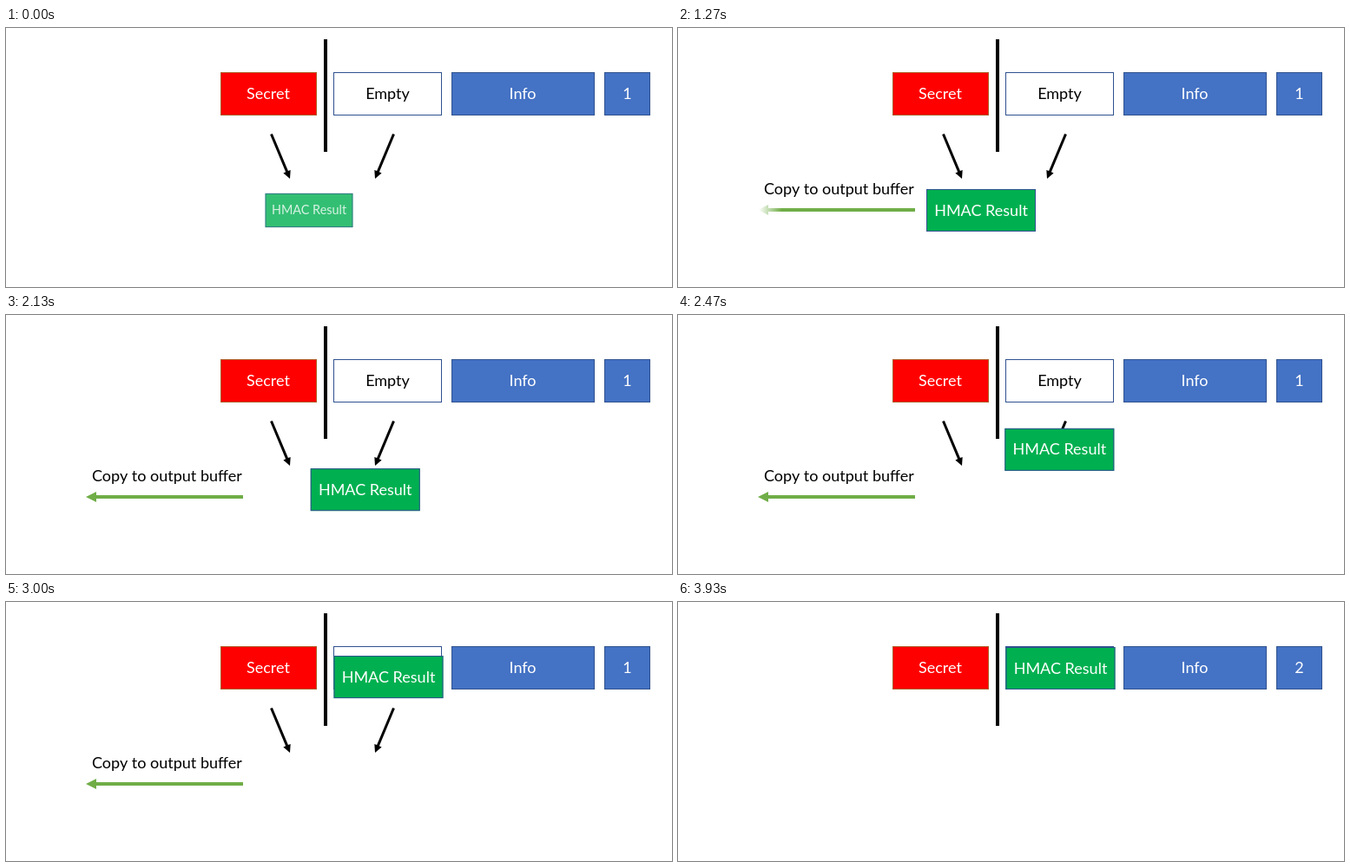
These frames come from a looping animation (767x299 px, 3.99 s). An HTML page with a canvas:

```html
<!DOCTYPE html>
<html lang="en">
<head>
<meta charset="utf-8">
<title>Key expansion step</title>
<style>
  html, body { margin: 0; width: 100%; height: 100%; overflow: hidden; background: #fff; }
  canvas { display: block; }
</style>
</head>
<body>
<canvas id="stage" width="767" height="299"></canvas>
<script>
const ctx = document.getElementById('stage').getContext('2d');
const LOOP = 3990;
const STEP = 200 / 3;
const NAVY = '#2f528f', BLUE = '#4472c4', GREEN = '#00b050';

const clamp = v => Math.min(1, Math.max(0, v));
const progress = (t, start, length) => clamp((t - start) / length);

// Progress along the travel path: [tick, fraction]
const travelKeys = [
  [22, 0], [28, .084], [32, .359], [36, .573],
  [37, .611], [44, .931], [45, .95], [51, 1]
];

function slopeAt(keys, i) {
  if (i === 0 || i === keys.length - 1) return 0;
  const [a, b] = [keys[i - 1], keys[i + 1]];
  return (b[1] - a[1]) / (b[0] - a[0]);
}

function smoothKeys(keys, x) {
  if (x <= keys[0][0]) return keys[0][1];
  const i = keys.findIndex(key => key[0] >= x);
  if (i < 0) return keys[keys.length - 1][1];
  const [x0, y0] = keys[i - 1], [x1, y1] = keys[i];
  const span = x1 - x0, u = (x - x0) / span, u2 = u * u, u3 = u2 * u;
  return y0 + (y1 - y0) * (3 * u2 - 2 * u3)
    + span * slopeAt(keys, i - 1) * (u3 - 2 * u2 + u)
    + span * slopeAt(keys, i) * (u3 - u2);
}

// Straight right, rounded turn, straight up
function travelOffset(s) {
  const w = 91.5, h = -134, turnIn = .226, turnOut = .668;
  if (s < turnIn) return [w / 2 * s / turnIn, 0];
  if (s > turnOut) return [w, h / 2 * (1 + (s - turnOut) / (1 - turnOut))];
  const t = (s - turnIn) / (turnOut - turnIn), r = 1 - t;
  const cubic = (a, b, c, d) => a * r ** 3 + 3 * b * r * r * t + 3 * c * r * t * t + d * t ** 3;
  return [w * cubic(.5, .724, 1, 1), h * cubic(0, 0, .276, .5)];
}

function label(text, x, baseline, color, align = 'center') {
  ctx.font = '18px Lato, Carlito, sans-serif';
  ctx.textAlign = align;
  ctx.fillStyle = color;
  ctx.fillText(text, x, baseline);
}

function box(x, y, w, h, fill, border) {
  ctx.fillStyle = fill;
  ctx.fillRect(x, y, w, h);
  ctx.strokeStyle = border;
  ctx.lineWidth = 1;
  ctx.strokeRect(x + .5, y + .5, w - 1, h - 1);
}

function arrow(x0, y0, x1, y1, width, paint) {
  const length = Math.hypot(x1 - x0, y1 - y0), head = width * 3;
  ctx.save();
  ctx.translate(x1, y1);
  ctx.rotate(Math.atan2(y1 - y0, x1 - x0));
  ctx.fillStyle = paint;
  ctx.beginPath();
  ctx.moveTo(0, 0);
  ctx.lineTo(-head, head / 2);
  ctx.lineTo(-head, width / 2);
  ctx.lineTo(-length, width / 2);
  ctx.lineTo(-length, -width / 2);
  ctx.lineTo(-head, -width / 2);
  ctx.lineTo(-head, -head / 2);
  ctx.fill();
  ctx.restore();
}

function withAlpha(alpha, draw) {
  if (alpha <= 0) return;
  ctx.save();
  ctx.globalAlpha = alpha;
  draw();
  ctx.restore();
}

// Soft-edged wipe from right to left
function outputArrow(wipe) {
  const left = 92, right = 273, soft = 27;
  const front = right - (right - left + soft) * wipe;
  const length = right - left;
  // Gradient runs in the arrow's own rotated space, tip at zero
  const paint = ctx.createLinearGradient(left - front, 0, left - front - soft, 0);
  paint.addColorStop(0, 'rgba(112,173,71,0)');
  paint.addColorStop(1, 'rgb(112,173,71)');
  arrow(left + length, 210, left, 210, 4, paint);
}

function resultBox(zoom, dx, dy) {
  ctx.save();
  ctx.translate(349 + dx, 210.5 + dy);
  ctx.scale(zoom, zoom);
  ctx.globalAlpha = zoom;
  box(-63, -24.5, 126, 49, GREEN, NAVY);
  label('HMAC Result', 0, 6, '#fff');
  ctx.restore();
}

function draw(tick) {
  const t = tick * STEP;
  const fade = progress(t, 3425, 500);

  ctx.fillStyle = '#fff';
  ctx.fillRect(0, 0, 767, 299);

  box(247, 51, 111, 50, '#f00', '#ae5a21');
  label('Secret', 302, 82, '#fff');
  ctx.fillStyle = '#000';
  ctx.fillRect(366, 13, 4, 130);
  box(377, 51, 125, 50, '#fff', NAVY);
  label('Empty', 439.5, 82, '#000');
  box(513, 51, 165, 50, BLUE, NAVY);
  label('Info', 595, 82, '#fff');
  box(689, 51, 53, 50, BLUE, NAVY);
  withAlpha(1 - fade, () => label('1', 715.5, 82, '#fff'));
  withAlpha(fade, () => label('2', 715.5, 82, '#fff'));

  withAlpha(1 - fade, () => {
    arrow(305.5, 122.5, 327, 174, 3, '#000');
    arrow(446.5, 122.5, 425, 174, 3, '#000');
    if (tick >= 6) label('Copy to output buffer', 99, 192, '#000', 'left');
    outputArrow(progress(t, 400, 1000));
  });

  const zoom = Math.min(1, .8 + Math.max(0, tick - 4) * .133);
  resultBox(tick >= 6 ? 1 : zoom, ...travelOffset(smoothKeys(travelKeys, tick)));
}

// Fifteen ticks a second, each starting on a whole hundredth
function tickAt(t) {
  const tick = Math.floor(t / STEP + .06);
  return Math.round(tick * STEP / 10) * 10 > t ? tick - 1 : tick;
}

const start = performance.now();
function loop() {
  draw(Math.min(59, tickAt((performance.now() - start) % LOOP)));
  requestAnimationFrame(loop);
}
loop();
</script>
</body>
</html>
```
